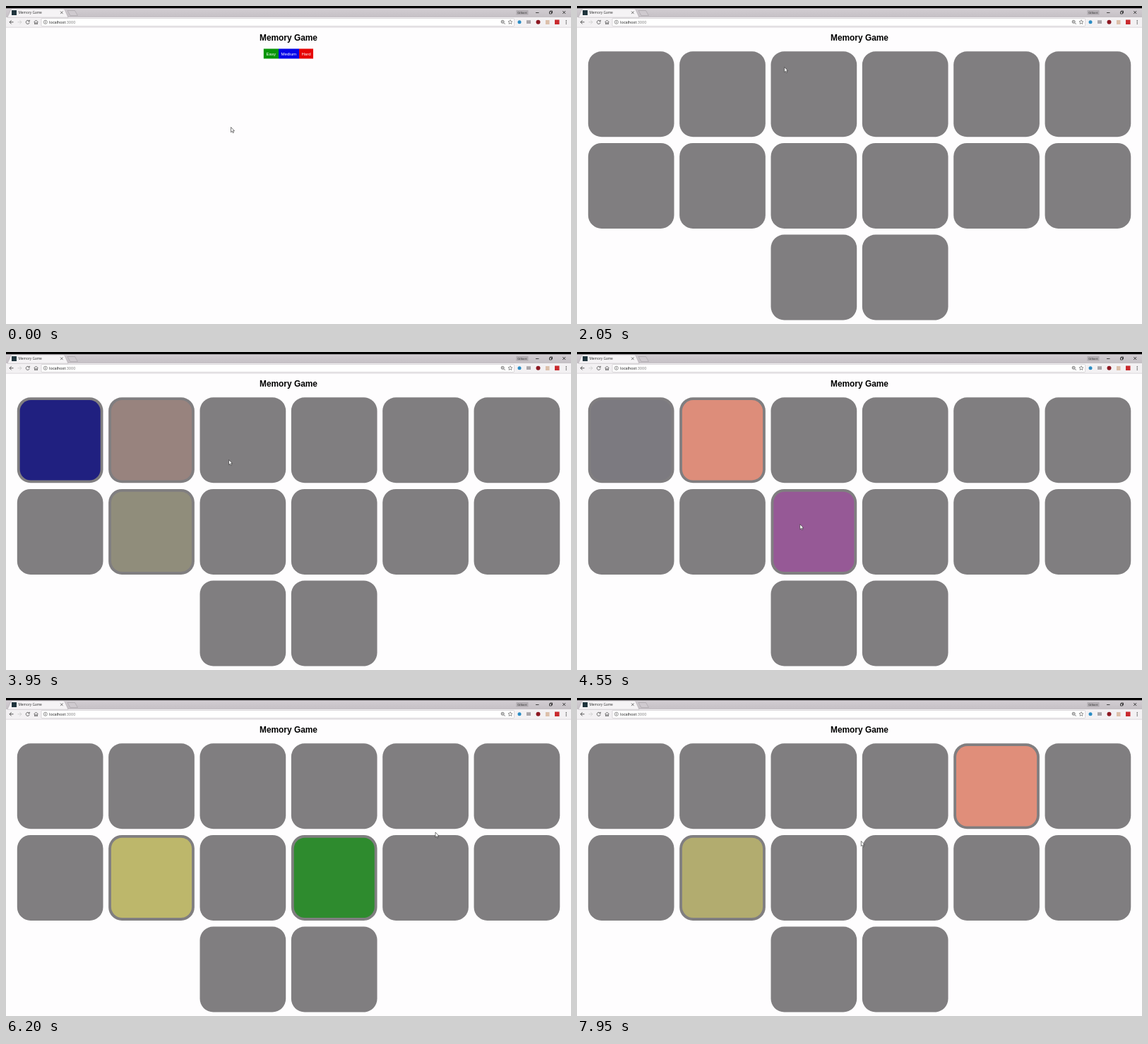
An HTML page for the animation above (8 s loop, 800x450 px).

```html
<!DOCTYPE html>
<html lang="en">
<head>
<meta charset="utf-8">
<title>Memory Game</title>
<style>
  html, body { margin: 0; width: 100%; height: 100%; overflow: hidden; background: #fefdfe; }
  svg { display: block; width: 100vw; height: 100vh; }
  text { font-family: "Liberation Sans", Arial, sans-serif; }
  .tab { font: 4.8px "Open Sans", sans-serif; fill: #333; }
  .url { font: 5.7px Roboto, sans-serif; fill: #333; }
  .line { fill: none; stroke: #555; stroke-width: .8; }
  .label { font-size: 6.1px; fill: #fff; text-anchor: middle; }
</style>
</head>
<body>
<svg viewBox="0 0 800 450" preserveAspectRatio="none">
  <defs>
    <linearGradient id="strip" x2="0" y2="1">
      <stop stop-color="#d3ced3"/><stop offset="1" stop-color="#c4bfc4"/>
    </linearGradient>
    <filter id="blur" x="-50%" y="-50%" width="200%" height="200%"><feGaussianBlur stdDeviation="1.3"/></filter>
  </defs>

  <rect width="800" height="450" fill="#fefdfe"/>
  <g id="browser">
    <rect y="3" width="800" height="13.5" fill="url(#strip)"/>
    <rect width="800" height="3.2"/>
    <rect y="16" width="800" height="14" fill="#f3f1f3"/>
    <path d="M0 30.2H800" stroke="#c9c5c9" stroke-width=".6"/>
    <path d="M2 16.2 7 5Q7.500 4 9 4H81Q82.500 4 83 5L88 16.200Z" fill="#f5f3f5" stroke="#aaa5aa" stroke-width=".5"/>
    <path d="M87 6.500H97.500L101.500 13.500H91Z" fill="#cfcacf" stroke="#a49fa4" stroke-width=".6"/>
    <rect x="8" y="6" width="7" height="7" fill="#20353d"/>
    <text class="tab" x="17.500" y="11.300">Memory Game</text>
    <path class="line" d="m77 7.500 3.600 3.600m0-3.600L77 11.100"/>
    <rect x="722.500" y="6" width="17" height="6.500" fill="#b1acb1"/>
    <text class="tab" x="731" y="11" text-anchor="middle" style="font-size:4.300px">Gilbert</text>
    <path class="line" style="stroke:#222" d="M750 9.500h4.500M769.500 8h3v3h-3zM770.500 8V7h3v3h-1M788.200 7l4 4m0-4-4 4"/>

    <path class="line" d="M10.500 22.800H5m2.600-2.600L5 22.800l2.600 2.600" style="stroke-width:1"/>
    <path class="line" d="M16.500 22.800H22m-2.600-2.600 2.600 2.600-2.600 2.600" style="stroke:#ccc"/>
    <path class="line" d="M32.700 21.300A2.500 2.500 0 1 0 33.200 23.400M33.300 19.800v2h-2" style="stroke-width:.9"/>
    <path class="line" d="m39.500 23 3-3 3 3M40.500 22.500v3h1.500v-2h1v2h1.500v-3"/>
    <rect x="50" y="17.500" width="669.500" height="11" rx="1" fill="#fff" stroke="#c6c2c6" stroke-width=".6"/>
    <circle class="line" cx="55.800" cy="22.800" r="2.600" style="stroke-width:.6"/>
    <path class="line" d="M55.800 22.300v2M55.800 21v.7"/>
    <text class="url" x="61" y="24.900">localhost<tspan fill="#888">:3000</tspan></text>
    <circle class="line" cx="703.200" cy="22.300" r="2"/>
    <path class="line" d="m704.700 23.800 2 2M702.200 22.300h2"/>
    <path class="line" d="m714 19.700.9 2 2.100.2-1.600 1.400.5 2.200-1.900-1.200-1.900 1.200.5-2.200-1.600-1.400 2.100-.2z" style="stroke-width:.6"/>
    <circle cx="727" cy="22.800" r="2.500" fill="#2b8cc4"/>
    <rect x="737" y="20.200" width="6" height="4.800" fill="#aaa6aa"/>
    <circle cx="753.500" cy="22.800" r="3" fill="#8c1822"/>
    <rect x="764" y="20" width="5.500" height="6" fill="#dcc0aa"/>
    <rect x="777" y="19.500" width="6.500" height="6.500" fill="#c92a2e"/>
    <path d="M792.600 20h1.300v1.300h-1.300zm0 2.200h1.300v1.300h-1.300zm0 2.200h1.300v1.300h-1.300z" fill="#555"/>
  </g>

  <text x="400" y="49.200" font-size="11.900" font-weight="bold" text-anchor="middle">Memory Game</text>

  <g id="menu">
    <rect x="386" y="60.500" width="29" height="14" fill="#0505e8"/>
    <text class="label" x="400.300" y="70">Medium</text>
    <rect x="415" y="60.500" width="20" height="14" fill="#e60505"/>
    <text class="label" x="425" y="70">Hard</text>
    <rect id="shadow" x="365.500" y="62" width="22" height="14" opacity="0" filter="url(#blur)"/>
    <g id="easy">
      <rect x="364.800" y="60.500" width="21.200" height="14" fill="#089508"/>
      <text class="label" x="375.300" y="70">Easy</text>
    </g>
  </g>
  <g id="board"></g>

  <path id="arrow" d="M0 0V7.200L1.700 5.700 2.800 8.100 4 7.600 2.900 5.200H5Z" fill="#fff" stroke="#333" stroke-width=".65"/>
  <path id="hand" d="M-.6.300Q0-.4.600.300V3L4 3.800Q4.800 4 4.600 5L3.800 8.500H-.4L-2.800 5Q-2.200 4-.6 5.200Z" fill="#fff" stroke="#222" stroke-width=".65"/>
</svg>
<script>
const LOOP = 8000, STEP = 50, START = 1850;
const HOVER = 1250;
const byId = id => document.getElementById(id);
const clamp = v => Math.min(1, Math.max(0, v));

// The board: fourteen cards, the last two centred
const colors = { 0: 'navy', 1: '#e08e7a', 4: '#e08e7a', 7: 'darkkhaki', 8: '#c800c8', 9: '#009400' };
const clicks = [[2815, 0], [3440, 7], [3770, 1], [4350, 8], [4940, 7], [5830, 9], [6450, 4], [7430, 7]];

function addRect(x, y, w, h, rx, fill) {
  const rect = document.createElementNS('http://www.w3.org/2000/svg', 'rect');
  Object.entries({ x, y, width: w, height: h, rx, fill }).forEach(([k, v]) => rect.setAttribute(k, v));
  return byId('board').appendChild(rect);
}

const cards = Array.from({ length: 14 }, (_, i) => {
  const x = 15.8 + 129.35 * (i < 12 ? i % 6 : i - 10);
  const y = 64.3 + 129.6 * Math.floor(i / 6);
  addRect(x, y, 121.7, 121, 19, '#807e80');
  return { face: addRect(x + 3.8, y + 3.8, 114.1, 113.4, 15.5, colors[i] || 'none'), toggles: [] };
});

// Every third click hides the open pair and opens a new card
let open = [];
for (const [time, i] of clicks) {
  if (open.length === 2) {
    open.forEach(j => cards[j].toggles.push([time, 0]));
    open = [];
  }
  cards[i].toggles.push([time, 1]);
  open.push(i);
}

// cubic-bezier(.25, .1, .25, 1)
function ease(x) {
  if (x <= 0 || x >= 1) return clamp(x);
  let lo = 0, hi = 1;
  for (let n = 0; n < 20; n++) {
    const s = (lo + hi) / 2;
    const bx = .75 * s * (1 - s) + s ** 3;
    if (bx < x) lo = s; else hi = s;
  }
  return .3 * lo * (1 - lo) ** 2 + 3 * lo * lo * (1 - lo) + lo ** 3;
}

// A reversed fade takes only as long as the distance left
function reveal(toggles, t) {
  let value = 0;
  toggles.forEach(([time, target], n) => {
    if (t < time) return;
    const end = Math.min(t, toggles[n + 1]?.[0] ?? t);
    const span = Math.abs(target - value) * 1000 || 1;
    value += (target - value) * ease((end - time) / span);
  });
  return value;
}

const path = [
  [0, 318.5, 171.5], [300, 322, 190], [850, 354, 108], [1300, 377.5, 68], [1850, 377.5, 68],
  [2500, 105, 128], [2815, 106, 126], [3000, 132.5, 123.5], [3380, 200, 253], [3440, 202, 253],
  [3770, 228, 152], [3950, 315.5, 152.5], [4350, 332, 238], [4500, 328, 245], [4940, 220, 234],
  [5150, 213, 222], [5750, 482, 240], [5950, 482, 240], [6200, 608, 190], [6450, 600, 150],
  [6850, 592, 146], [7430, 216, 238], [7650, 235, 238], [7950, 402.3, 202.5], [8000, 402.3, 202.5]
];

function pointer(t) {
  const n = path.findIndex(p => p[0] > t);
  const [t0, x0, y0] = path[n - 1], [t1, x1, y1] = path[n];
  const k = (t - t0) / (t1 - t0);
  return [x0 + (x1 - x0) * k, y0 + (y1 - y0) * k];
}

function draw(now) {
  let t = Math.floor(now % LOOP / STEP) * STEP;
  if (t > 5800 && t < 5950) t = 5800; // short stall
  const playing = t >= START;
  byId('menu').style.display = playing ? 'none' : '';
  byId('board').style.display = playing ? '' : 'none';
  const lift = ease((t - HOVER) / 200);
  byId('easy').setAttribute('transform', `translate(0 ${-1.6 * lift})`);
  byId('shadow').setAttribute('opacity', .65 * lift);
  cards.forEach(c => c.face.setAttribute('opacity', reveal(c.toggles, t)));
  const pointing = t >= HOVER && !playing;
  byId('hand').style.display = pointing ? '' : 'none';
  byId('arrow').style.display = pointing ? 'none' : '';
  byId(pointing ? 'hand' : 'arrow').setAttribute('transform', `translate(${pointer(t)})`);
}

let begin;
function tick(now) {
  begin ??= now;
  draw(now - begin);
  requestAnimationFrame(tick);
}
draw(0);
requestAnimationFrame(tick);
</script>
</body>
</html>
```
